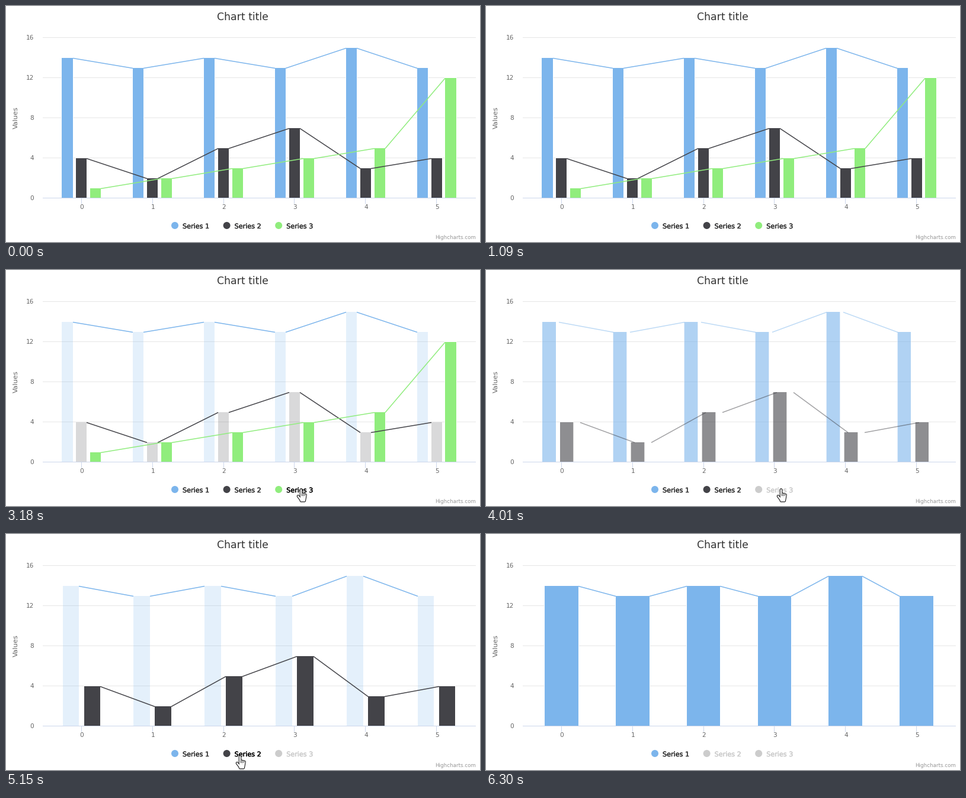
Recreate the animation shown at these times as a matplotlib script. Size 800 px wide and 400 px high, loop 8000 ms.

```python
import numpy as np
import matplotlib.pyplot as plt
from matplotlib.animation import FuncAnimation
from matplotlib.collections import LineCollection, PolyCollection
from matplotlib.patches import Circle
from matplotlib.patheffects import withStroke
from matplotlib.transforms import Affine2D

W, H, DPI = 800, 400, 100
LOOP, STEP = 8000, 40
PX = 72 / DPI  # points per pixel

COLORS = ["#7cb5ec", "#434348", "#90ed7d"]
DATA = np.array([[14, 13, 14, 13, 15, 13],
                 [4, 2, 5, 7, 3, 4],
                 [1, 2, 3, 4, 5, 12]])

# Plot area; the category axis runs from -0.55 to 5.55
LEFT, RIGHT, BASE, UNIT = 62, 793, 325, 17
PITCH = (RIGHT - LEFT) / 6.1
CENTERS = LEFT + PITCH * (.55 + np.arange(6))
GROUP, FILL = .6, .8  # share of a category per group, of a slot per column
ITEM_X, ITEM_STEP, ITEM_Y = 279, 87.6, 372

RESET, GROW, REDRAW = 120, 980, 500
CLICKS = (3800, 5760)
ENTER, LEAVE = 1960, 6280
# Pointer moves: start, end, destination
MOVES = [(ENTER, 2060, 311, 371), (2600, 3160, 498, 370), (4720, 5120, 395, 375)]


def ease(p):
    return .5 - .5 * np.cos(np.pi * np.clip(p, 0, 1))


def stage(t):
    return sum(t >= c for c in CLICKS)


def pointer(t):
    x, y = 311, 394
    for t0, t1, nx, ny in MOVES:
        e = ease((t - t0) / (t1 - t0))
        x, y = x + (nx - x) * e, y + (ny - y) * e
    return x, y


def hovered(t):
    """Index of the visible series whose legend item is under the pointer."""
    if not ENTER <= t < LEAVE:
        return None
    x, y = pointer(t)
    s, inside = divmod(x - ITEM_X, ITEM_STEP)
    return int(s) if s < 3 - stage(t) and inside < 70 and y < 382 else None


def progress(t):
    """Eased progress of the latest redraw."""
    k = stage(t)
    return ease((t - CLICKS[k - 1] + 50) / REDRAW) if k else 1


def opacity(s, t):
    lit = progress(t)
    if lit == 1:
        lit = np.mean([hovered(t - d) in (None, s) for d in range(0, 50, 10)])
    return .2 + .8 * lit


def columns(n, s):
    """Pixel-aligned left and right edges of series s when n are visible."""
    slot = PITCH * GROUP / n
    x = CENTERS + slot * (s - (n - 1) / 2) - slot * FILL / 2
    return np.round(x), np.round(x + slot * FILL) - 1


def boxes(left, right, top, pad=0):
    low = BASE + pad
    return [[(a - pad, low), (a - pad, y - pad), (b + pad, y - pad), (b + pad, low)]
            for a, b, y in zip(left, right, top)]


fig = plt.figure(figsize=(W / DPI, H / DPI), dpi=DPI, facecolor="white")
ax = fig.add_axes([0, 0, 1, 1])
ax.set(xlim=(0, W), ylim=(H, 0))
ax.axis("off")


def label(x, y, text, px, color="#666666", ha="center", **kw):
    return ax.text(x, y, text, fontsize=px * PX, color=color, ha=ha,
                   family="DejaVu Sans", **kw)


def lines(segs, color, width=1, z=1, **kw):
    art = LineCollection(segs, colors=color, linewidths=width * PX, zorder=z, **kw)
    art.set_snap(False)
    return ax.add_collection(art, autolim=False)


def polys(z, **kw):
    art = PolyCollection([], zorder=z, **kw)
    art.set_snap(False)
    return ax.add_collection(art, autolim=False)


# Fixed parts
axis = BASE + .5
lines([[(LEFT, axis - UNIT * v), (RIGHT, axis - UNIT * v)] for v in range(4, 17, 4)],
      "#e6e6e6")
lines([[(LEFT, axis), (RIGHT, axis)]]
      + [[(x, axis), (x, axis + 10)] for x in np.round(CENTERS) - .5], "#ccd6eb", z=6)
for i, x in enumerate(CENTERS):
    label(x, 344, str(i), 10.5)
for v in range(0, 17, 4):
    label(47, 329 - UNIT * v, str(v), 10.5, ha="right")
label(399, 24, "Chart title", 17.3, "#333333")
label(17, 189, "Values", 11.5, va="center", rotation=90)
label(RIGHT, 395, "Highcharts.com", 8.75, "#999999", ha="right")

# Moving parts
bars, borders, links, dots, names = [], [], [], [], []
for s, color in enumerate(COLORS):
    x = ITEM_X + ITEM_STEP * s
    bars.append(polys(3 + .1 * s, facecolors=color, linewidths=0))
    borders.append(polys(3.05 + .1 * s, facecolors="none", edgecolors="white",
                         linewidths=PX))
    links.append(lines([], color, 1.5, 5 + .1 * s))
    dots.append(ax.add_patch(Circle((x + 6, ITEM_Y), 6, lw=0, zorder=7)))
    names.append(label(x + 19, 377, f"Series {s + 1}", 11.2, ha="left", zorder=7))

# Hand pointer: round strokes for fingers and thumb, black under white
fingers = [[(2.5 * k, 2.4 if k == 0 else 9 + .7 * k), (1.9 * k, 21.3)] for k in range(4)]
fingers.append([(-5, 13.3), (0, 20)])
gaps = [[(2.5 * k - 1.25, 8.5 + .7 * k), (2.5 * k - 1.25, 13)] for k in range(1, 4)]
hand = [lines(fingers, "black", 4.6, 9, capstyle="round"),
        lines(fingers, "white", 2.6, 9.1, capstyle="round"),
        lines(gaps, "black", .8, 9.2)]


def draw_series(s, t):
    n, p = 3 - stage(t), progress(t)
    parts = bars[s], borders[s], links[s]
    for part in parts:
        part.set_visible(s < n)
    if s >= n:
        return
    left, right = columns(n, s)
    top = BASE + 1 - UNIT * DATA[s]
    corners = zip(right, left[1:], top + .5, top[1:] + .5)
    links[s].set_segments([[(a, ya), (b, yb)] for a, b, ya, yb in corners])
    fade = p
    if n < 3:
        old_left, old_right = columns(n + 1, s)
        left = old_left + (left - old_left) * p
        right = old_right + (right - old_right) * p
    elif t >= RESET:
        top = BASE + (top - BASE) * ease((t - RESET + 20) / GROW)
        fade = ease((t - RESET) / REDRAW)
    bars[s].set_verts(boxes(left, right, top))
    borders[s].set_verts(boxes(left, right, top, .5))
    for part, a in zip(parts, (opacity(s, t), opacity(s, t), fade)):
        part.set_alpha(a)


def draw_legend(s, t):
    off = s >= 3 - stage(t)
    color = "#cccccc" if off else "#000000" if hovered(t) == s else "#333333"
    dots[s].set_facecolor("#cccccc" if off else COLORS[s])
    names[s].set_color(color)
    # Synthetic bold
    names[s].set_path_effects([withStroke(linewidth=.45 * PX, foreground=color)])


def update(n):
    t = n * STEP
    for s in range(3):
        draw_series(s, t)
        draw_legend(s, t)
    move = Affine2D().translate(*pointer(t)) + ax.transData
    for part in hand:
        part.set_visible(ENTER <= t < LEAVE)
        part.set_transform(move)
    return []


anim = FuncAnimation(fig, update, frames=LOOP // STEP, interval=STEP,
                     repeat=True, repeat_delay=0, blit=False)
plt.show()
```
